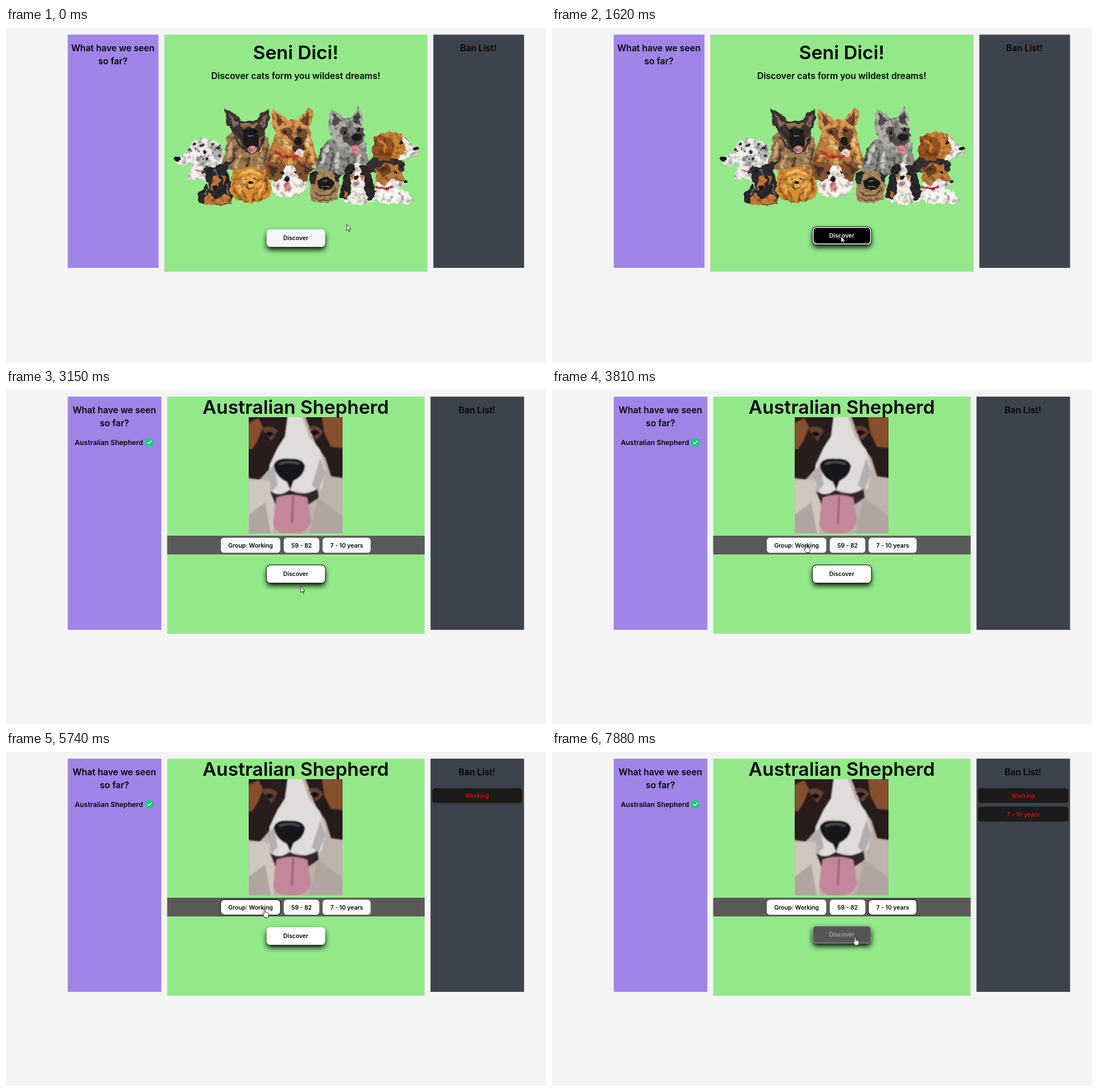
An HTML page that plays this animation: 950 by 589 pixels, repeating every 8000 ms.

```html
<!DOCTYPE html>
<html lang="en">
<head>
<meta charset="utf-8">
<title>Discover</title>
<style>
html, body { margin: 0; width: 100%; height: 100%; overflow: hidden; background: #f4f4f4; }
svg { display: block; width: 950px; height: 589px; }
text { font: 600 15.6px Inter, sans-serif; text-anchor: middle; fill: #060606; }
.title { font-size: 33.3px; }
.label { font-size: 10.35px; }
.seen { font-size: 12.2px; text-anchor: start; }
.ban text { font-size: 10.4px; font-weight: 500; fill: #f00; }
.ban rect { fill: #1b1b1a; }
.green { fill: #93e98a; }
.purple { fill: #a084e8; }
.slate { fill: #3d434d; }
.ring rect { fill: none; stroke: #fff; stroke-width: 1.6; }
.ring rect:first-child { stroke: #101010; stroke-width: 1.2; }
.dark { fill: #1c1a1c; }
.tongue { fill: #dd8890; }
.line { fill: none; stroke-linecap: round; }

/* Every state holds until the next one, so all tracks step */
.track { animation: 8s step-end infinite; }
#home { animation-name: home; }
#result { animation-name: result; }
#button { animation-name: lift; }
#face { animation-name: face; filter: drop-shadow(0 5px 5px rgba(0, 0, 0, .95)); }
#caption { animation-name: caption; }
#buttonRing { animation-name: buttonRing; }
#groupRing { animation-name: groupRing; }
#yearsRing { animation-name: yearsRing; }
#group { animation-name: group; }
#weight { animation-name: weight; }
#years { animation-name: years; }
#ban1 { animation-name: ban1; }
#ban2 { animation-name: ban2; }
#cursor { animation-name: move; }
#arrow { animation-name: arrow; }
#hand { animation-name: hand; }

@keyframes home { 0% { opacity: 1 } 21.875%, 100% { opacity: 0 } }
@keyframes result { 0% { opacity: 0 } 21.875%, 100% { opacity: 1 } }
@keyframes buttonRing { 0%, 61.5%, 100% { opacity: 0 } 18.75% { opacity: 1 } }
@keyframes groupRing { 0%, 85.5%, 100% { opacity: 0 } 61.5% { opacity: 1 } }
@keyframes yearsRing { 0% { opacity: 0 } 85.5%, 100% { opacity: 1 } }
@keyframes ban1 { 0% { opacity: 0 } 64.625%, 100% { opacity: 1 } }
@keyframes ban2 { 0% { opacity: 0 } 88.625%, 100% { opacity: 1 } }
@keyframes group { 0% { fill: #f8f8f8 } 47.625% { fill: #fcfcfc } 61.5%, 100% { fill: #fff } }
@keyframes weight { 0% { fill: #f8f8f8 } 80.25%, 100% { fill: #fff } }
@keyframes years { 0% { fill: #f8f8f8 } 83.625%, 100% { fill: #fff } }
@keyframes lift {
  0% { transform: translateY(0) }
  10.25% { transform: translateY(-2px) }
  11.875% { transform: translateY(-4px) }
  13.625% { transform: translateY(-4.3px) }
  21.875% { transform: translateY(-47.3px) }
  23.75%, 40.875%, 44.25%, 97% { transform: translateY(-46.6px) }
  25.375%, 45.75% { transform: translateY(-46px) }
  42.375% { transform: translateY(-47.3px) }
  98.5%, 100% { transform: translateY(-48.5px) }
}
@keyframes face {
  0% { fill: #f5f5f5; stroke: #f5f5f5 }
  10.25% { fill: #808080; stroke: #aaa }
  11.875% { fill: #151515; stroke: #ddd }
  13.625% { fill: #000; stroke: #fff }
  21.875% { fill: #5c5b5a; stroke: #ddd }
  23.75%, 40.875%, 44.25%, 97% { fill: #d0d0d0; stroke: #e0e0e0 }
  25.375%, 45.75% { fill: #fff; stroke: #fff }
  42.375% { fill: #a0a0a0; stroke: #ccc }
  98.5%, 100% { fill: #575655; stroke: #aaa }
}
@keyframes caption {
  0%, 25.375%, 45.75% { fill: #060606 }
  10.25%, 42.375% { fill: #777 }
  11.875% { fill: #eee }
  13.625% { fill: #fff }
  21.875%, 98.5%, 100% { fill: #a9a9a9 }
  23.75%, 40.875%, 44.25%, 97% { fill: #333 }
}
@keyframes move {
  0% { transform: translate(599px, 346px) }
  8.75% { transform: translate(582px, 353px) }
  10.25% { transform: translate(541px, 364px) }
  11.875% { transform: translate(508px, 367px) }
  39.375% { transform: translate(518px, 346px) }
  40.875% { transform: translate(505px, 315px) }
  42.375% { transform: translate(485px, 288px) }
  44.25% { transform: translate(454px, 274px) }
  45.75% { transform: translate(443px, 271px) }
  71.75% { transform: translate(451px, 276px) }
  73.375% { transform: translate(473px, 284px) }
  75.125% { transform: translate(489px, 291px) }
  76.75% { transform: translate(505px, 294px) }
  78.625% { transform: translate(522px, 288px) }
  80.25% { transform: translate(539px, 280px) }
  82.125% { transform: translate(570px, 275px) }
  83.625% { transform: translate(595px, 271px) }
  95.5% { transform: translate(585px, 281px) }
  97% { transform: translate(553px, 310px) }
  98.5%, 100% { transform: translate(529px, 325px) }
}
@keyframes arrow {
  0%, 42.375%, 75.125% { opacity: 1 }
  40.875%, 44.25%, 80.25%, 100% { opacity: 0 }
}
@keyframes hand {
  0%, 42.375%, 75.125% { opacity: 0 }
  40.875%, 44.25%, 80.25%, 100% { opacity: 1 }
}
</style>
</head>
<body>
<svg viewBox="0 0 950 589">
  <defs>
    <clipPath id="frame"><rect x="427" y="48" width="165" height="205"/></clipPath>
    <filter id="soft"><feGaussianBlur stdDeviation="1.2"/></filter>
    <!-- ragged edges and uneven tones, like brushwork -->
    <filter id="brush" x="285" y="125" width="450" height="200" filterUnits="userSpaceOnUse" color-interpolation-filters="sRGB">
      <feTurbulence type="fractalNoise" baseFrequency=".11" numOctaves="2" seed="4" result="noise"/>
      <feDisplacementMap in="SourceGraphic" in2="noise" scale="8" xChannelSelector="R" yChannelSelector="G" result="ragged"/>
      <feColorMatrix in="noise" values="0 0 1.6 0 .15  0 0 1.6 0 .15  0 0 1.6 0 .15  0 0 0 0 1" result="tone"/>
      <feComposite in="ragged" in2="tone" operator="arithmetic" k1=".7" k2=".33" result="mixed"/>
      <feComposite in="mixed" in2="ragged" operator="in" result="painted"/>
      <feComponentTransfer in="painted"><feFuncA type="linear" slope="1.1"/></feComponentTransfer>
    </filter>
  </defs>

  <g id="home" class="track">
    <rect class="purple" x="108.6" y="11.7" width="159.7" height="411.3"/>
    <rect class="green" x="278.4" y="11.7" width="463.2" height="418.1"/>
    <rect class="slate" x="751.8" y="11.7" width="159.6" height="411.3"/>
    <text x="188" y="41">What have we seen</text>
    <text x="188" y="64">so far?</text>
    <text x="831" y="41">Ban List!</text>
    <text class="title" x="509.7" y="54.5">Seni Dici!</text>
    <text x="509.7" y="90">Discover cats form you wildest dreams!</text>

    <g filter="url(#brush)">
      <!-- spotted -->
      <path fill="#e9e6e4" d="M295 230L318 219Q324 198 345 195Q372 196 383 214L380 238Q366 240 356 256L352 270 336 264 318 272 324 250 330 240Q308 243 298 238Z"/>
      <path fill="#b3b0b1" d="M358 201Q378 203 382 222L374 236Q362 226 358 201ZM334 228L350 222 356 236 340 244Z"/>
      <path class="line" stroke="#2d2b2d" stroke-width="5" stroke-dasharray="0 13" d="M322 214Q345 192 352 222T336 262M362 205Q382 214 372 234"/>
      <path class="line" stroke="#4a474a" stroke-width="3" stroke-dasharray="0 9" d="M310 226L336 212 346 232 362 222 376 208"/>
      <path class="line" stroke="#b4484c" stroke-width="2.5" d="M333 250L354 252"/>
      <ellipse class="dark" cx="301" cy="231" rx="6" ry="4"/>

      <!-- black-masked -->
      <path fill="#9c7a52" d="M376 246Q390 212 388 190L405 176H452L464 205 460 250Q420 258 376 246Z"/>
      <path class="line" stroke="#c5a172" stroke-width="5" d="M396 205L390 240M412 224L404 246M450 212L446 246"/>
      <path class="line" stroke="#5f4836" stroke-width="4" d="M402 214L398 238M428 230L424 250M458 214L455 240"/>
      <path fill="#3e3331" d="M385 143Q404 148 414 164H440Q450 146 462 142Q466 166 456 180L454 204Q444 226 428 222Q404 212 400 186Q384 172 385 143Z"/>
      <path fill="#806360" d="M391 150L409 168 400 177ZM459 149L445 168 455 175Z"/>
      <path fill="#94704a" d="M412 168H443L437 178 428 172 418 179ZM402 188L412 196 416 212ZM453 190L444 198 446 212Z"/>
      <ellipse class="dark" cx="431" cy="195" rx="14" ry="18"/>
      <path class="line" stroke="#6f6b73" stroke-width="3" d="M426 190H434"/>
      <ellipse class="tongue" cx="434" cy="214" rx="8" ry="7"/>
      <circle cx="419" cy="182" r="2.3"/><circle cx="441" cy="181" r="2.3"/>

      <!-- shepherd -->
      <path fill="#b87a3d" d="M456 238Q466 205 474 188H536L550 240Q505 252 456 238Z"/>
      <path class="line" stroke="#e0a75e" stroke-width="6" d="M474 226L470 238M500 234V240M536 210L540 234"/>
      <path class="line" stroke="#71492d" stroke-width="4" d="M486 234L484 242M528 226L530 242M464 222L462 234"/>
      <path fill="#d5924c" d="M469 143Q486 150 494 162H512Q524 148 537 141Q542 160 534 174L540 205Q525 228 508 224Q484 218 478 195L472 178Q464 160 469 143Z"/>
      <path fill="#70492f" d="M473 148L490 165 478 175ZM534 148L516 165 531 173ZM481 181L494 174 505 184 518 173 530 182 524 208 508 214 500 196Z"/>
      <path fill="#e6bd80" d="M482 194L496 200 504 216 490 210ZM528 190L536 200 528 216Z"/>
      <path fill="#c38648" d="M502 176H510L516 196 504 194Z"/>
      <ellipse class="dark" cx="514" cy="200" rx="8" ry="6"/>
      <path fill="#42302a" d="M502 210L526 205 524 216 506 219Z"/>
      <ellipse fill="#f0d7d3" cx="517" cy="220" rx="8" ry="7"/>
      <circle cx="492" cy="183" r="2.3"/><circle cx="518" cy="181" r="2.3"/>
      <path class="line" stroke="#c3302b" stroke-width="4" d="M474 217Q488 231 512 227"/>

      <!-- grey -->
      <path fill="#8b8a84" d="M543 254Q548 215 570 195H630L640 244Q600 270 543 254Z"/>
      <path class="line" stroke="#c6c4bb" stroke-width="6" d="M566 208L556 238M584 222L580 252M622 224L618 240"/>
      <path class="line" stroke="#5b5a59" stroke-width="4" d="M556 212L549 240M576 220L570 252M604 228L602 244"/>
      <path fill="#aaa9a2" d="M572 143Q588 150 596 160H606Q614 146 623 138Q630 160 627 174L634 205Q622 226 606 220Q578 212 572 190Q562 165 572 143Z"/>
      <path fill="#514a4a" d="M574 148L592 164 575 174ZM621 144L609 163 625 173ZM588 178Q605 169 628 180Q634 204 612 214Q592 204 588 178Z"/>
      <path fill="#83827f" d="M597 164H610L616 184 604 192Z"/>
      <ellipse class="dark" cx="618" cy="193" rx="9" ry="6"/>
      <ellipse class="tongue" cx="614" cy="214" rx="8" ry="8"/>
      <circle cx="595" cy="183" r="2.2"/><circle cx="621" cy="180" r="2.2"/>

      <!-- long-eared -->
      <path fill="#343132" d="M632 242L655 218 698 226 702 250 686 262 640 254Z"/>
      <path fill="#c87c35" d="M650 193Q665 180 690 183Q705 190 708 200L726 212Q726 222 716 226L695 234 672 228Z"/>
      <path fill="#eee8e2" d="M696 185L706 199 724 210Q726 222 715 226L696 233 686 232 706 215 697 201Z"/>
      <path fill="#92501f" d="M648 192Q668 184 682 202Q686 222 671 235Q648 234 643 220Z"/>
      <path class="line" stroke="#c9772e" stroke-width="4" d="M656 198Q670 202 667 220"/>
      <ellipse class="dark" cx="721" cy="213" rx="5" ry="4"/><circle cx="695" cy="203" r="2.5"/>

      <!-- black and tan -->
      <path fill="#29282c" d="M347 246L364 246 376 240 398 234 388 250 393 264 399 294 398 309Q365 316 339 308L338 292 352 276 360 286 350 262Z"/>
      <path fill="#c07634" d="M364 262L372 258 376 268 372 282 361 287ZM380 259L388 262 383 278ZM347 302L356 291 372 302 386 292 398 300 397 309 352 313Z"/>
      <path class="line" stroke="#65636a" stroke-width="3" d="M368 249L371 260M388 276L391 292M354 284L349 294"/>
      <ellipse class="dark" cx="368" cy="282" rx="5" ry="4"/>

      <!-- fluffy -->
      <path fill="#d18932" d="M397 251Q410 250 415 247Q433 242 449 249L464 251 463 267 468 284 460 300Q432 314 405 304L393 288 396 274Z"/>
      <path class="line" stroke="#a65f21" stroke-width="3" d="M404 262L400 280 407 297M416 286L422 302M456 262L460 282 450 300M438 290L434 304"/>
      <path class="line" stroke="#edb55e" stroke-width="4" d="M412 258Q428 248 448 258M410 280L414 294M452 276L445 294"/>
      <ellipse fill="#e5a64b" cx="430" cy="272" rx="18" ry="13"/>
      <ellipse class="dark" cx="430" cy="273" rx="4" ry="3"/>
      <path class="line" stroke="#663b1d" stroke-width="2" d="M420 265H424M436 265H440M423 281Q430 285 438 280"/>

      <!-- butterfly-eared -->
      <path fill="#f2ece5" d="M478 250Q498 232 520 248L530 278 522 292 510 296 496 300 472 294 466 276Z"/>
      <path fill="#825231" d="M455 237Q476 232 492 243L486 264 474 272 458 262ZM506 241Q522 231 535 238L544 250 532 256 530 272 516 266Z"/>
      <path fill="#4f3527" d="M460 242L478 246 470 264ZM522 240L540 249 527 260Z"/>
      <ellipse class="dark" cx="495" cy="266" rx="5" ry="4"/>
      <ellipse class="tongue" cx="495" cy="280" rx="6" ry="9"/>
      <circle cx="486" cy="256" r="2.4"/><circle cx="509" cy="255" r="2.4"/>

      <!-- flat-faced -->
      <path fill="#a88459" d="M538 254Q560 248 584 256L587 276 582 304Q562 313 538 305L534 288Z"/>
      <path class="line" stroke="#65503b" stroke-width="3" d="M542 290Q558 300 575 290M545 300Q560 308 576 300"/>
      <path fill="#302b2b" d="M533 256L549 252 545 272 535 276ZM574 254L588 259 587 274 580 270Z"/>
      <ellipse class="dark" cx="562" cy="275" rx="14" ry="12"/>
      <path class="line" stroke="#7c6b5b" stroke-width="2" d="M556 268H566M556 281Q562 276 569 281"/>

      <!-- silky -->
      <path fill="#eee8e2" d="M597 248Q617 230 638 248L646 284 651 304Q616 318 588 304Z"/>
      <path fill="#2b2729" d="M598 244Q611 233 615 248L606 264 607 290 598 304 585 298 592 272ZM621 246Q631 235 640 248L645 270 651 296 639 305 630 288 631 264Z"/>
      <path fill="#c0743a" d="M604 260L611 258 610 271ZM622 259L630 260 626 271ZM596 286L603 292 598 301Z"/>
      <ellipse class="dark" cx="616" cy="263" rx="5" ry="4"/><ellipse class="tongue" cx="617" cy="274" rx="4" ry="4"/>
      <circle cx="607" cy="256" r="2.5"/><circle cx="626" cy="256" r="2.5"/>

      <!-- terrier -->
      <path fill="#f2eeea" d="M652 270L686 258 706 270Q700 281 689 282L708 290 718 305 710 310H664Q643 304 651 284Z"/>
      <path fill="#b77639" d="M650 248L666 238 688 240 696 258 706 269 690 270 680 264 666 278 651 270Z"/>
      <path fill="#724122" d="M651 246L672 240 678 254 662 264Z"/>
      <path class="line" stroke="#c03343" stroke-width="5" d="M652 281Q668 286 679 280"/>
      <path class="line" stroke="#c5bfbf" stroke-width="3" d="M665 294L662 306M690 291L700 302"/>
      <ellipse class="dark" cx="703" cy="270" rx="4" ry="3"/><circle cx="686" cy="256" r="2.3"/>
    </g>
  </g>

  <g id="result" class="track">
    <rect class="purple" x="108.6" y="11.7" width="164.6" height="411.3"/>
    <rect class="green" x="283.6" y="11.7" width="452.9" height="418.1"/>
    <rect class="slate" x="746.8" y="11.7" width="164.6" height="411.3"/>
    <text x="190.7" y="41">What have we seen</text>
    <text x="190.7" y="64">so far?</text>
    <text x="828.5" y="41">Ban List!</text>
    <text class="seen" x="121" y="96.5">Australian Shepherd</text>
    <rect fill="#00d26a" x="246" y="86" width="12.4" height="12.4" rx="1.8"/>
    <path class="line" stroke="#fff" stroke-width="1.4" d="M249 92.5L251.2 94.8 255.8 89.6"/>
    <text class="title" x="509.7" y="42">Australian Shepherd</text>

    <g clip-path="url(#frame)">
      <path fill="#beb2ab" d="M427 48H592V253H427Z"/>
      <g filter="url(#soft)">
        <path fill="#2a1e1b" d="M420 40H500L492 82 474 112 463 140 446 158 420 154Z"/>
        <path fill="#251d1c" d="M524 40H600V156L572 152 562 120 546 98Z"/>
        <path fill="#87502f" d="M427 58L444 50 452 66 442 90 433 104 427 104ZM556 48H592V102L572 100 560 76Z"/>
        <path fill="#654333" d="M450 68Q464 59 478 72L467 90ZM532 66Q546 58 558 74L546 88Z"/>
        <path fill="#e0dcdc" d="M496 44H520L533 82 552 105 562 140 556 172 538 188 520 180 498 176 476 188 461 164 464 132 478 102 491 82Z"/>
        <path fill="#b4aeb0" d="M458 146L472 132 478 168 468 178ZM553 120L562 145 550 178 538 168Z"/>
        <path fill="#d0c7bf" d="M427 160L457 158 472 190 470 253H427Z"/>
        <path fill="#b0a59f" d="M427 220L456 198 466 253H427ZM548 190L592 222V253H534Z"/>
        <path fill="#33272a" d="M464 178Q482 190 499 176Q520 190 548 174L550 190 532 202H474Z"/>
        <path fill="#c4869a" d="M476 190Q501 180 530 190L537 232Q530 253 504 253Q474 256 470 236Z"/>
        <path class="line" stroke="#915c70" stroke-width="3" d="M505 188L503 234"/>
        <path fill="#19171d" d="M471 132Q476 119 499 121Q522 120 526 134Q524 152 506 160L500 176 494 162Q474 153 471 132Z"/>
        <path class="line" stroke="#484853" stroke-width="4" d="M482 130Q499 124 515 130"/>
        <path fill="#151114" d="M456 77Q464 69 472 78L464 83ZM535 74Q544 66 552 75L543 81Z"/>
      </g>
    </g>

    <rect fill="#5c5a59" x="283.6" y="257" width="452.9" height="33"/>
    <rect id="group" class="track" x="378" y="260.5" width="104.5" height="26.5" rx="5.5"/>
    <rect id="weight" class="track" x="488.7" y="260.5" width="62.5" height="26.5" rx="5.5"/>
    <rect id="years" class="track" x="557" y="260.5" width="84.5" height="26.5" rx="5.5"/>
    <g id="groupRing" class="track ring">
      <rect x="377.8" y="260.3" width="105" height="27" rx="6"/>
      <rect x="379.2" y="261.7" width="102.2" height="24.2" rx="5"/>
    </g>
    <g id="yearsRing" class="track ring">
      <rect x="556.8" y="260.3" width="85" height="27" rx="6"/>
      <rect x="558.2" y="261.7" width="82.2" height="24.2" rx="5"/>
    </g>
    <text class="label" x="430.3" y="277.7">Group: Working</text>
    <text class="label" x="520" y="277.7">59 - 82</text>
    <text class="label" x="599.4" y="277.7">7 - 10 years</text>

    <g id="ban1" class="track ban">
      <rect x="749.5" y="63.7" width="158.7" height="26.4" rx="5.5"/>
      <text x="828.8" y="80.5">Working</text>
    </g>
    <g id="ban2" class="track ban">
      <rect x="749.5" y="96.2" width="158.7" height="26.6" rx="5.5"/>
      <text x="828.8" y="113.5">7 - 10 years</text>
    </g>
  </g>

  <g id="button" class="track">
    <rect id="face" class="track" x="459" y="355.5" width="102" height="30" rx="5.5"/>
    <g id="buttonRing" class="track ring">
      <rect x="458.2" y="354.7" width="103.6" height="31.6" rx="6.5"/>
      <rect x="459.5" y="356" width="101" height="29" rx="5.5"/>
    </g>
    <text id="caption" class="track label" x="509.8" y="374.3">Discover</text>
  </g>

  <g id="cursor" class="track" fill="#fff" stroke="#111" stroke-width=".9" stroke-linejoin="round">
    <path id="arrow" class="track" d="M.4 .4V11.2L2.8 9 4.5 12.8 6.2 12 4.6 8.4H7.8Z"/>
    <path id="hand" class="track" d="M3 2Q4.1 -.2 5.3 2V6.6L9.8 7.7Q11.5 8.2 11.3 10.4L10 15.8H4.3L.7 10.6Q.2 8.6 2 8.7L3 9.8Z"/>
  </g>
</svg>
</body>
</html>
```
